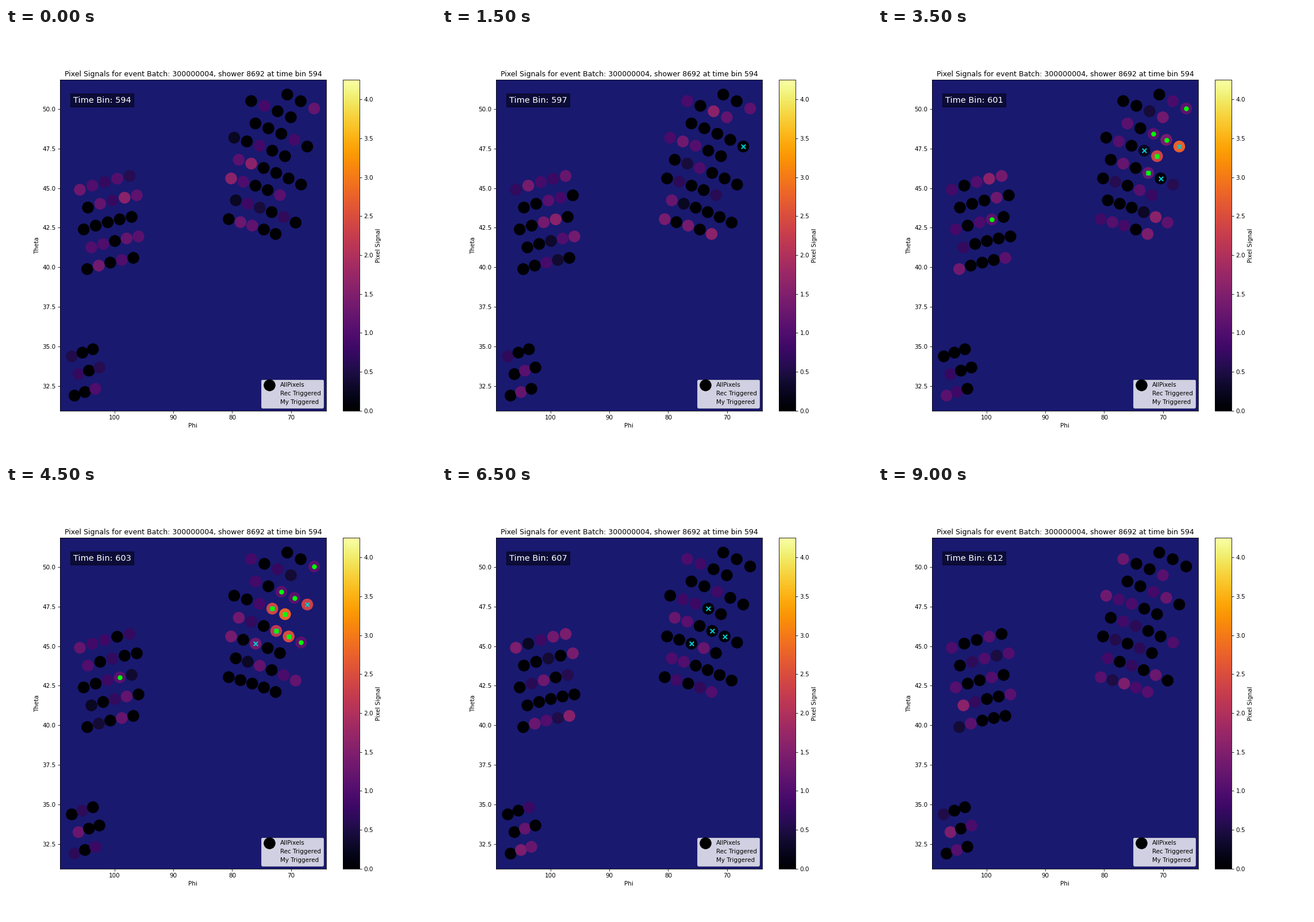
A matplotlib script for the animation above (9.5 s loop, 748 by 748 pixels).

```python
import matplotlib.pyplot as plt
import numpy as np
from matplotlib.animation import FuncAnimation

SIZE = 748
FIRST_BIN, BINS = 594, 19
VMAX = 4.255

# Shower key points in order of arrival: pixel, peak bin, amplitude
TRACK = [(11, 601.9, 3.95), (16, 602.1, 4.0), (20, 602.3, 2.7),
         (15, 603.3, 2.5), (21, 604.0, 3.9), (25, 604.3, 2.8)]
WIDTH = 1.06

EARLY = [2, 9, 10, 16, 20, 52]
LATE = [15, 21, 22]


def camera(starts, ends, x, dx, y, dy, bend):
    """Bent hexagonal lattice; pairs hold a value and its change per row."""
    rows = []
    for v, first in enumerate(starts):
        u = np.arange(first, ends[v % 2] + 0.1)
        px = np.polyval(x, v) + np.polyval(dx, v) * u
        py = (np.polyval(y, v) + np.polyval(dy, v) * u
              + np.polyval(bend, v) * u**2)
        rows.append(np.column_stack([px, SIZE - py]))
    return np.vstack(rows)


def signals(t):
    """Noise in every pixel, replaced by the shower along its track."""
    rng = np.random.default_rng(t)
    n = len(points)
    values = np.clip(rng.normal(0.95, 0.33, n), 0.25, 1.6)
    values[rng.random(n) < 0.52] = 0
    for pixel, peak, amp in TRACK:
        values[pixel] = amp * np.exp(-((t - peak) / WIDTH) ** 2 / 2)
    hits = my_hits(t)
    values[hits] = np.maximum(values[hits], 1.1)
    return values


def rec_hits(t):
    starts = 597 + 0.9 * np.arange(len(TRACK))
    return [p for (p, _, _), s in zip(TRACK, starts) if s <= t <= s + 8.4]


def my_hits(t):
    return EARLY * (600 <= t <= 604) + LATE * (602 <= t <= 605)


fig, ax = plt.subplots(figsize=(10, 10), dpi=SIZE / 10)
ax.set_facecolor("midnightblue")
ax.set(xlim=(109.27, 64.02), ylim=(30.93, 51.86), xlabel="Phi", ylabel="Theta",
       xticks=[100, 90, 80, 70])
ax.set_title("Pixel Signals for event Batch: 300000004, "
             "shower 8692 at time bin 594")

norm = plt.Normalize(0, VMAX)
fig.colorbar(plt.cm.ScalarMappable(norm, "inferno"), ax=ax, label="Pixel Signal")

stage = np.vstack([
    camera([2.5, 0, 0.5, -1, -0.5, -1, -0.5, -1], (4.5, 3),
           x=(0.16, -4.4, 430.8), dx=(-0.43, 23.4),
           y=(35.1, 92), dy=(-0.36, 8.1), bend=(-0.02, 0.57)),
    camera([0, 0.5, 0, 0.5, 0], (4, 4.5),
           x=(-0.07, 3.5, 128.5), dx=(-0.4, 21.65),
           y=(34.5, 281.4), dy=(0.28, -7.6), bend=(0, 0.4)),
    camera([0, 0.5, 0], (2, 2.5),
           x=(2.4, 114.5), dx=(-0.15, 18.4),
           y=(34.1, 571.2), dy=(0.15, -6.8), bend=(0, 0.3)),
])
points = ax.transData.inverted().transform(stage)

pixels = ax.scatter(*points.T, s=350, c=signals(FIRST_BIN), cmap="inferno",
                    norm=norm)
rec = ax.scatter([], [], s=50, c="darkturquoise", marker="x", linewidths=2)
mine = ax.scatter([], [], s=50, c="lime")

for label, color in [("AllPixels", "black"), ("Rec Triggered", "none"),
                     ("My Triggered", "none")]:
    ax.scatter([], [], s=350, c=color, label=label)
ax.legend(loc="lower right")

clock = ax.text(0.05, 0.95, "", transform=ax.transAxes, fontsize=14,
                color="white", va="top",
                bbox=dict(facecolor="black", alpha=0.5))


def update(i):
    t = FIRST_BIN + i
    pixels.set_array(signals(t))
    rec.set_offsets(points[rec_hits(t)])
    mine.set_offsets(points[my_hits(t)])
    clock.set_text(f"Time Bin: {t}")
    return pixels, rec, mine, clock


anim = FuncAnimation(fig, update, frames=BINS, interval=500, repeat=True)
plt.show()
```
